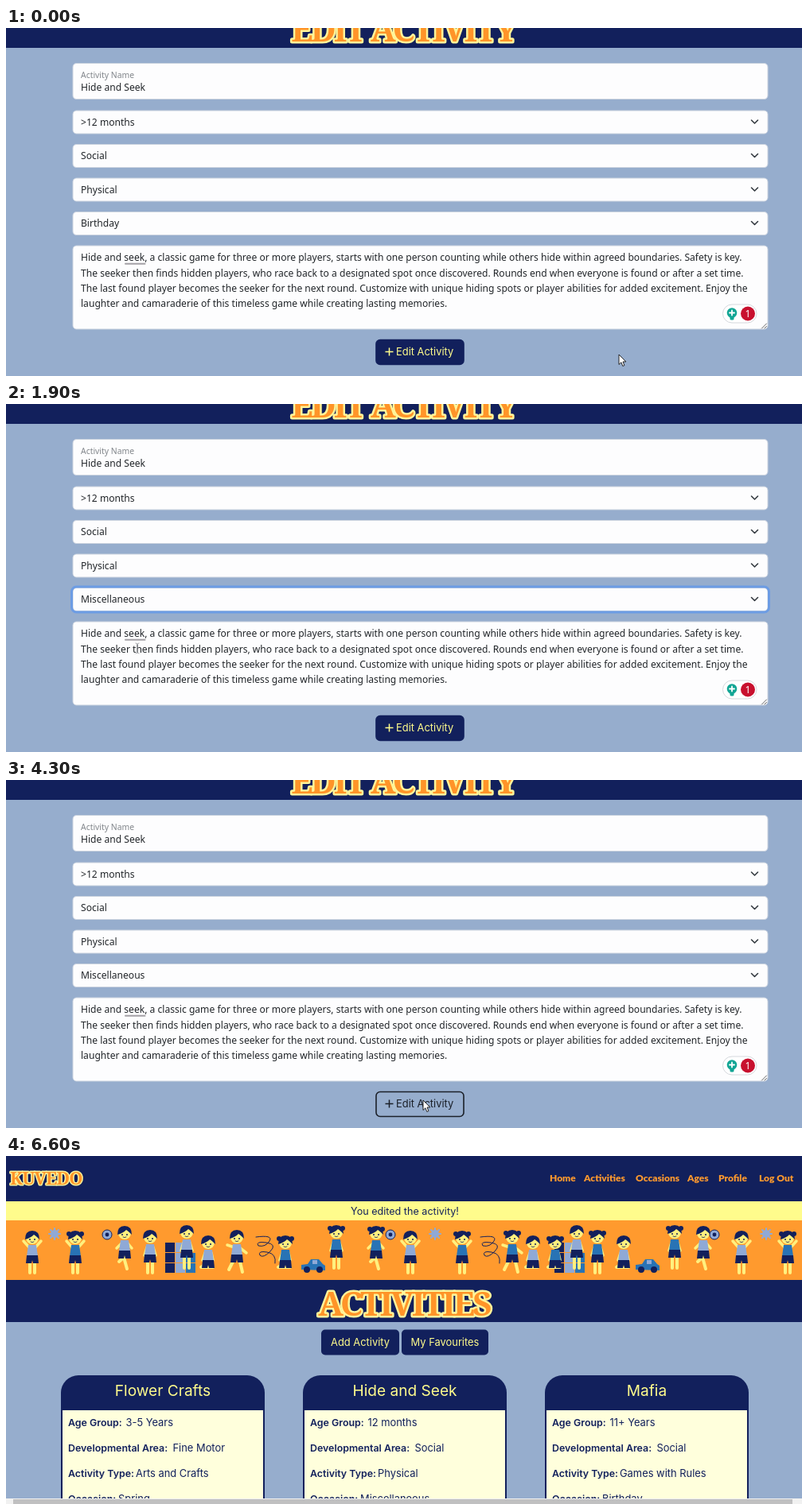
Recreate the animation shown at these times as an HTML page. Size 1000x438 px, loop 6700 ms.

```html
<!DOCTYPE html>
<html lang="en">
<head>
<meta charset="utf-8">
<title>Edit activity</title>
<style>
  html, body { margin: 0; width: 100%; height: 100%; overflow: hidden; background: #96adcd; }
  svg { display: block; width: 100vw; height: 100vh; }
  .form { font: 12.1px "Noto Sans", sans-serif; fill: #212529; }
  .ui { font: 12.9px Inter, sans-serif; }
  .nav { font: 900 12px Lato, sans-serif; fill: #ff9a2e; }
  .fancy { font: 900 42px "Noto Serif", serif; letter-spacing: -3px; fill: #ff9428;
    stroke: #fff59a; stroke-width: 5px; stroke-linejoin: round; paint-order: stroke; }
  .logo { font-size: 22px; letter-spacing: -1px; stroke-width: 3px; }
</style>
</head>
<body>
<svg id="stage" viewBox="0 0 1000 438"></svg>
<script>
const NAVY = '#12205c', YELLOW = '#fffc8c', ORANGE = '#ff9a2e', BLUE = '#2873b5', PALE = '#8fa9d6';
const stage = document.getElementById('stage');

const rect = (x, y, w, h, fill, more = '') =>
  `<rect x="${x}" y="${y}" width="${w}" height="${h}" fill="${fill}" ${more}/>`;
const circle = (x, y, r, fill, more = '') => `<circle cx="${x}" cy="${y}" r="${r}" fill="${fill}" ${more}/>`;
const line = (d, color, width = 1) =>
  `<path d="${d}" fill="none" stroke="${color}" stroke-width="${width}" stroke-linecap="round" stroke-linejoin="round"/>`;
const text = (x, y, words, more = '') => `<text x="${x}" y="${y}" ${more}>${words}</text>`;
const group = (content, more = '') => `<g ${more}>${content}</g>`;
const middle = 'text-anchor="middle"';

// Edit form
const box = (y, h) => rect(84, y + .5, 873, h - 1, '#fdfdfe', 'rx="4.5" stroke="#cbd3df"');
const select = (y, value, id = '') => box(y, 30) +
  text(94, y + 19.3, value, id && `id="${id}"`) + line(`M936.5 ${y + 12.5}l4 4 4-4`, '#343a40', 1.6);

const story = [
  'Hide and seek, a classic game for three or more players, starts with one person counting while others hide within agreed boundaries. Safety is key.',
  'The seeker then finds hidden players, who race back to a designated spot once discovered. Rounds end when everyone is found or after a set time.',
  'The last found player becomes the seeker for the next round. Customize with unique hiding spots or player abilities for added excitement. Enjoy the',
  'laughter and camaraderie of this timeless game while creating lasting memories.'];

const checker = line('M150 296.7H174.5', '#a3a0a5', 2) +
  rect(900.5, 348, 42.5, 23, '#fff', 'rx="11.5" stroke="#d5d8dd"') +
  circle(912, 358.5, 6.3, '#12a594') + rect(909.5, 363, 5, 4.5, '#12a594', 'rx="1.5"') +
  line('M912 355.5v6M909 358.5h6', '#fff', 1.8) +
  circle(932, 359.5, 9, '#c8102e') + text(932, 363.8, '1', `${middle} fill="#fff"`);

const options = ['Birthday', 'Halloween', 'Miscellaneous', 'Spring'];
const dropdown = rect(84.5, 260.5, 872, 71, '#fdfdfe', 'stroke="#74777d"') +
  rect(85, 278, 871, 17.7, '#1a66d4', 'id="highlight"') +
  options.map((name, i) => text(94, 274.3 + i * 17.6, name, 'class="option"')).join('');

const form = rect(0, 0, 1000, 438, '#96adcd') + rect(0, 0, 1000, 25, NAVY) +
  text(499, 17, 'EDIT ACTIVITY', `class="fancy" ${middle}`) +
  group(
    box(44, 46) + text(94, 62.5, 'Activity Name', 'font-size="10.4" fill="#82868b"') +
    text(94, 78.7, 'Hide and Seek') +
    select(103.5, '&gt;12 months') + select(146, 'Social') + select(188.5, 'Physical') +
    select(231, 'Birthday', 'occasion') +
    rect(82.5, 230, 876, 32, 'none', 'rx="6" stroke="#6c9ce4" stroke-width="3" id="ring"') +
    box(273.5, 106) + story.map((words, i) => text(94, 293.3 + i * 19.2, words)).join('') +
    line('M949.5 378l6-6M953 378l2.5-2.5', '#666') +
    group(checker, 'id="checker"') + group(dropdown, 'id="dropdown"'), 'class="form"') +
  group(
    rect(465, 392.5, 110, 31, NAVY, 'rx="5" id="buttonBox" stroke-width="1.6"') +
    '<path id="plus" d="M476.5 407.5h10M481.5 402.5v10" stroke-width="1.5"/>' +
    text(490, 412, 'Edit Activity', 'id="buttonText"'), 'class="ui"') +
  group('', 'id="pointer"');

// Activities page
const poses = {
  up: 'M-3 13L-11 4M3 13L11 4|M-3 27V44M3 27V44',
  kick: 'M-4 13L-10 19M4 13L9 19|M-2 27L3 45M3 27L-7 36',
  stand: 'M-4 13L-7 23M4 13L7 23|M-3 27V45M3 27V45',
  run: 'M-3 13L-12 10M3 13L12 20|M-3 27L-10 41M3 27L7 44',
  sit: 'M-4 13L-7 22M4 13L6 22|M-3 27L-9 31H6'
};
function kid(pose, x, y, shirt, i) {
  const [arms, legs] = poses[pose].split('|');
  const bunches = i % 2 ? circle(-8, -5, 3, NAVY) + circle(8, -5, 3, NAVY) : '';
  return group(
    line(legs, '#fff07e', 4) + line(arms, '#fff07e', 3.5) +
    `<path d="M-5 9H5L7 23H-7Z" fill="${shirt}"/><path d="M-7 22H7L8 32H1L0 28L-1 32H-8Z" fill="${NAVY}"/>` +
    bunches + circle(0, 0, 8, '#fff07e') +
    `<path d="M-9 2Q-9 -9 0 -9Q9 -9 9 2Q4 -3 2 -4Q-2 0 -9 2Z" fill="${NAVY}"/>` +
    circle(-3, 2, 1, NAVY) + circle(3, 2, 1, NAVY) + line('M-2 5Q0 6.5 2 5', NAVY, .8),
    `transform="translate(${x} ${y})"`);
}
const kids = (pose, y, xs) => xs.map((x, i) => kid(pose, x, y, i % 2 ? BLUE : PALE, i)).join('');

const blocks = x => [0, 1, 2, 3, 4, 5, 6, 7].map(i => {
  const row = i / 3 | 0;
  return rect(x + i % 3 * 13, 135 - row * 13, 12, 12, [NAVY, PALE, BLUE, '#fff07e'][(i + row) % 4]);
}).join('');
const ball = (x, y) => circle(x, y, 6, PALE, `stroke="${NAVY}"`) + circle(x, y, 2.4, NAVY);
const star = (x, y) => circle(x, y, 5, PALE) +
  line(`M${x - 7} ${y}h14M${x} ${y - 7}v14M${x - 5} ${y - 5}l10 10M${x + 5} ${y - 5}l-10 10`, PALE, 2);
const ribbon = x => line(`M${x - 9} 102q22-3 17 5t-14 6q-4-6 10-4t5 11-13 5q-3-6 9-4t10 14`, NAVY);
const car = x => `<path d="M${x - 14} 143v-6l8-1 4-6h10l5 6 3 2v6z" fill="${BLUE}"/>` +
  rect(x, 131, 6, 5, PALE) + circle(x - 7, 143, 4, NAVY) + circle(x + 9, 143, 4, NAVY);

const banner = rect(0, 81, 1000, 75, ORANGE) +
  [200, 689].map(blocks).join('') + [385, 805].map(car).join('') + [323, 605].map(ribbon).join('') +
  kids('up', 103, [33, 87, 508, 573, 924, 982]) + kids('kick', 97, [149, 465, 876]) +
  kids('stand', 102, [181, 743]) + kids('stand', 96, [227, 415, 717, 840]) +
  kids('run', 102, [290, 636]) + kids('sit', 109, [254, 351, 662, 690, 776]) +
  [127, 483, 890].map(x => ball(x, 99)).join('') + [61, 539, 955].map(x => star(x, 98)).join('');

const labels = [['Age Group:', 72.5], ['Developmental Area:', 131.5], ['Activity Type:', 85], ['Occasion:', 63]];
const card = (x, title, values) =>
  `<path d="M${x} 438V298a22 22 0 0 1 22-22h212a22 22 0 0 1 22 22V438z" fill="${NAVY}"/>` +
  rect(x + 2, 320, 252, 118, '#ffffdc') +
  text(x + 128, 302, title, `${middle} fill="${YELLOW}" font-size="19.1"`) +
  labels.map(([label, shift], i) =>
    text(x + 9, 340 + i * 32, label, 'font-weight="600" font-size="12.4"') +
    text(x + 9 + shift, 340 + i * 32, values[i])).join('');
const button = (x, w, words) => rect(x, 218.5, w, 32, NAVY, 'rx="5"') +
  text(x + w / 2, 238.7, words, `${middle} fill="${YELLOW}"`);
const links = [[683, 'Home'], [726, 'Activities'], [791, 'Occasions'], [856, 'Ages'], [895, 'Profile'], [946, 'Log Out']];

const list = rect(0, 0, 1000, 438, '#96adcd') + rect(0, 0, 1000, 57, NAVY) +
  text(5, 36, 'KUVEDO', 'class="fancy logo"') +
  group(links.map(([x, name]) => text(x, 32, name)).join(''), 'class="nav"') +
  rect(0, 57, 1000, 24, YELLOW) + banner + rect(0, 156, 1000, 53, NAVY) +
  text(500, 201, 'ACTIVITIES', `class="fancy" ${middle}`) +
  group(
    text(501, 74, 'You edited the activity!', `${middle} font-size="12.6"`) +
    button(396, 98, 'Add Activity') + button(497, 109, 'My Favourites') +
    card(69, 'Flower Crafts', ['3-5 Years', 'Fine Motor', 'Arts and Crafts', 'Spring']) +
    card(373, 'Hide and Seek', ['12 months', 'Social', 'Physical', 'Miscellaneous']) +
    card(677, 'Mafia', ['11+ Years', 'Social', 'Games with Rules', 'Birthday']),
    `class="ui" fill="${NAVY}"`) +
  rect(0, 431, 1000, 7, '#f1f1f1') + rect(9, 432, 979, 6, '#c0c0c1');

stage.innerHTML = group(form, 'id="form"') + group(list, 'id="list"');
const $ = id => document.getElementById(id);
const show = (id, on) => $(id).style.display = on ? '' : 'none';

const cursors = {
  arrow: '<path d="M0 0V12.5L2.9 9.8L4.8 14.5L6.9 13.6L5 9H8.8Z" fill="#fff" stroke="#111" stroke-width=".9"/>',
  beam: line('M-2-6Q0-6 0-4Q0-6 2-6M0-4V6M-2 7Q0 7 0 5Q0 7 2 7', '#9a9ca2', .9),
  hand: '<path d="M-1.5 1Q0-1 1.5 1V5L6 6Q8 7 7.5 10L6 15H-.5L-5 9Q-4 6.500-1.5 9Z" fill="#fff" stroke="#111" stroke-width=".9"/>'
};
// time, x, y
const route = [
  [0, 770, 411], [200, 770, 411], [900, 150, 250], [1000, 150, 252], [1200, 151, 287],
  [1400, 158, 304], [1700, 160, 304], [1900, 165, 307], [2600, 536, 402],
  [3400, 536, 402], [4300, 524, 403], [4700, 524, 403], [5100, 493, 411], [6700, 493, 411]];

function place(t) {
  const i = route.findIndex(stop => stop[0] > t);
  const [t0, x0, y0] = route[i - 1], [t1, x1, y1] = route[i];
  const p = (t - t0) / (t1 - t0), ease = p * p * (3 - 2 * p);
  return [x0 + (x1 - x0) * ease, y0 + (y1 - y0) * ease];
}

function draw(t) {
  const [x, y] = place(t);
  show('form', t < 5400);
  show('list', t >= 5400);
  show('dropdown', t >= 1000 && t < 1700);
  show('ring', t >= 1000 && t < 3400);
  show('checker', t < 5100);
  $('occasion').textContent = t < 1700 ? 'Birthday' : 'Miscellaneous';

  const chosen = t < 1100 ? 0 : t < 1400 ? 1 : 2;
  $('highlight').setAttribute('y', 260.5 + chosen * 17.6);
  document.querySelectorAll('.option').forEach((option, i) =>
    option.setAttribute('fill', i === chosen ? '#fff' : '#212529'));

  const hover = t >= 2600 && t < 5000;
  const ink = hover ? '#1b2029' : YELLOW;
  $('buttonBox').setAttribute('fill', hover ? '#96adcd' : NAVY);
  $('buttonBox').setAttribute('stroke', hover ? '#1b2029' : NAVY);
  $('buttonText').setAttribute('fill', ink);
  $('plus').setAttribute('stroke', ink);

  const kind = t >= 5000 ? 'hand' : t >= 1800 && y < 379 ? 'beam' : 'arrow';
  $('pointer').innerHTML = cursors[kind];
  $('pointer').setAttribute('transform', `translate(${x} ${y})`);
}

function tick() {
  draw(Math.floor(performance.now() % 6700 / 100) * 100);
  requestAnimationFrame(tick);
}
tick();
</script>
</body>
</html>
```
